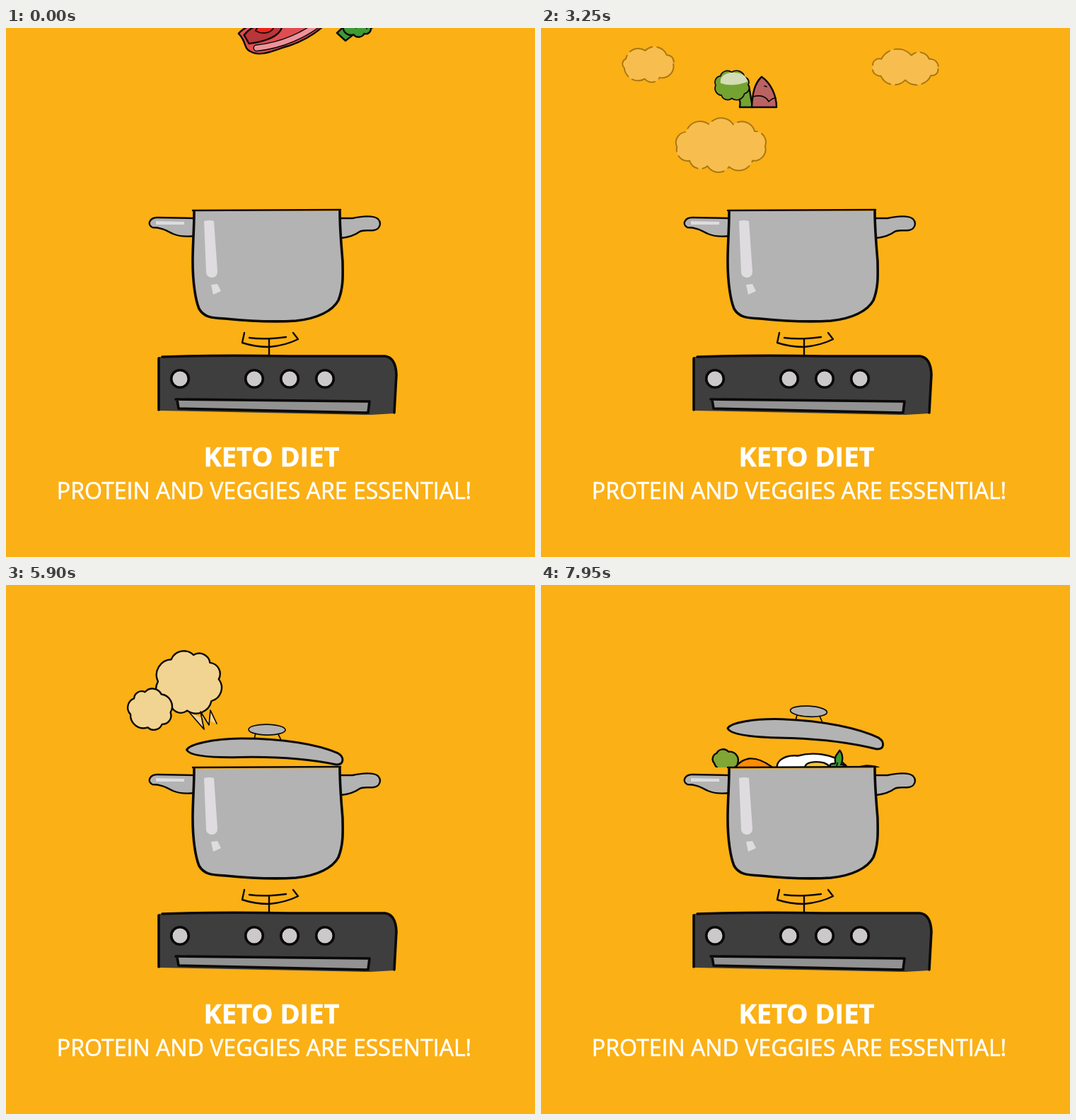
Animation of 748x748 px, one loop 8 s. Source, as an HTML page:

```html
<!DOCTYPE html>
<html lang="en">
<head>
<meta charset="utf-8">
<title>Keto diet</title>
<style>
  html, body { margin: 0; width: 100%; height: 100%; overflow: hidden; background: #fbb015; }
  svg { display: block; width: 100vw; height: 100vh; }
  .ink { stroke: #0b0908; stroke-width: 2.4; stroke-linecap: round; stroke-linejoin: round; }
  .line { fill: none; }
  .bold { stroke-width: 3.6; }
  .thin { stroke-width: 1.7; }
  .metal { fill: #b3b3b3; }
  .shine { fill: #dedcde; }
  .cream { fill: #f1d492; }
  .pink { fill: #f1d7c3; stroke-width: 2; stroke-dasharray: 34 7; }
  .fat { stroke: #ef9299; stroke-width: 7; }
  text { fill: #fff; stroke: #fff; stroke-width: .6; text-anchor: middle; font-family: "Open Sans", "Noto Sans", sans-serif; }
</style>
</head>
<body>
<svg viewBox="0 0 748 748">
  <defs><clipPath id="aboveRim"><rect width="748" height="258"/></clipPath></defs>

  <g id="steamBack" class="ink"></g>

  <g clip-path="url(#aboveRim)" class="ink">
    <g id="egg">
      <path fill="#fff" d="M330 165C319 150 335 138 355 139C372 133 405 132 422 148C434 158 428 170 412 170C390 178 345 173 330 165Z"/>
      <path fill="#f6c630" d="M366 156C364 147 380 145 392 147C404 151 406 160 395 163C384 166 372 162 366 156Z"/>
    </g>
    <g id="carrot">
      <path fill="#ff8b05" d="M262 178C254 162 264 147 280 143C298 140 318 154 338 174C360 198 376 218 395 240L385 250C340 225 290 200 262 178Z"/>
      <path fill="#80a634" data-cloud="247 146 21 13 5"/>
      <path fill="#4b9d2f" class="thin" d="M232 185L232 175C226 166 233 157 243 160C254 157 256 170 245 175C239 178 236 178 232 185Z"/>
    </g>
    <g id="fish">
      <path fill="#887c74" d="M244 194C262 180 300 184 325 198C340 206 350 216 356 225C352 240 318 247 295 243C268 238 250 215 244 194Z"/>
      <path fill="#c7c4c1" class="thin" d="M244 194C255 187 265 186 273 187C282 200 281 216 275 228C258 220 248 208 244 194Z"/>
      <path fill="#887c74" d="M354 225C355 205 365 190 384 190C384 202 376 215 366 222C378 224 385 233 388 243C372 250 358 242 354 225Z"/>
      <path id="scales" class="line"/>
    </g>
    <g id="steak">
      <path fill="#df4d50" d="M368 262C376 244 402 236 410 210C408 178 428 152 456 152C480 154 494 172 492 192C488 222 460 250 432 266C415 278 402 286 390 282C380 280 382 270 368 262Z"/>
      <path class="line" style="stroke-width:10" d="M398 275C428 264 462 240 483 206"/>
      <path class="line fat" d="M398 275C428 264 462 240 483 206"/>
      <path fill="#ad3537" d="M418 215C415 190 428 163 458 162C480 164 484 185 474 202C464 215 448 215 440 224C432 232 420 228 418 215Z"/>
      <path fill="#b93639" d="M376 262C386 240 410 232 425 238C424 252 405 264 386 272Z"/>
      <path fill="#ed241e" class="thin" d="M390 252C392 242 405 237 414 241C412 250 400 255 390 252Z"/>
    </g>
    <g id="herb">
      <path fill="#3c9b31" d="M404 178C388 174 399 161 401 157C396 146 406 151 407 148C404 138 410 135 412 130C418 136 417 146 415 150C423 148 419 158 416 160C425 165 414 178 404 178Z"/>
      <path class="line thin" d="M400 183L410 148"/>
    </g>
    <g id="broccoli" fill="#3f9b34">
      <path d="M428 251L440 262L462 245L444 236Z"/>
      <path data-cloud="457 232 26 25 10"/>
      <path class="line thin" d="M444 224q6-5 9 3M462 220q7-1 6 6M446 240q7-3 9 4M463 240q7-2 7 5"/>
    </g>
    <g id="soup">
      <path stroke="none" fill="#f4cf5d" d="M334 253Q355 247 376 252T420 251T468 250V260H334Z"/>
      <path class="line" d="M334 253Q355 247 376 252T420 251T468 250"/>
    </g>
  </g>

  <g id="steamMid" class="ink"></g>

  <g clip-path="url(#aboveRim)" class="ink">
    <g id="floret" fill="#74a331">
      <path d="M281 262Q284 245 270 247L294 232L299 262Z"/>
      <path class="thin" data-cloud="270 231 26 21 8"/>
      <path fill="#d3dcb4" stroke="none" d="M254 228Q252 216 268 213Q290 212 292 226Q270 234 254 228Z"/>
    </g>
    <g id="redFish">
      <path fill="#bb6263" d="M298 262C299 242 302 228 312 219C325 228 333 245 333 262Z"/>
      <path class="line thin" d="M300 247Q316 243 322 254Q327 249 332 249M316 232l3 1"/>
    </g>
  </g>

  <g id="lid" class="ink metal">
    <path class="line thin" style="fill:none" d="M351 215L349 223M383 215L387 223"/>
    <path style="stroke-width:3" d="M254 239C258 231 290 223 330 222C390 221 440 229 468 241C477 246 477 257 466 257C440 252 400 247 345 248C300 250 258 249 254 239Z"/>
    <ellipse class="thin" cx="367" cy="209" rx="26" ry="7.5"/>
  </g>

  <g class="ink metal">
    <path d="M267 269L214 268C203 268 199 278 207 282C220 282 228 287 236 291C245 295 258 295 267 294"/>
    <path d="M473 269L490 269C505 266 520 265 526 270C532 276 528 285 520 286C512 287 505 285 500 288C492 294 483 296 474 297"/>
    <path class="bold" d="M266 260C266 285 264 305 264 330C264 360 268 385 273 397C280 409 290 410 310 411C340 414 380 416 410 414C440 411 462 400 470 385C478 365 476 345 476 330C474 305 472 285 472 259"/>
    <path d="M264 258L473 257"/>
  </g>
  <path class="shine" d="M212 273L252 274V278H212ZM280 273Q287 271 294 273L299 344Q299 352 292 353Q284 353 283 346ZM290 363L299 362L304 372L293 377Z"/>

  <g class="ink">
    <path class="line" d="M337 431L334 445Q352 451 372 451Q395 449 413 440L406 431M344 438Q366 441 396 437M372 441V462"/>
    <path fill="#3e3e3e" stroke="none" d="M216 465H538Q551 467 552 490L549 545L515 547L216 541Z"/>
    <path class="line bold" d="M216 540V467M221 465Q300 462 400 464L536 464Q551 466 552 490L549 544"/>
    <path fill="#929292" class="bold" d="M240 525L514 528L512 544L244 538L242 526"/>
    <g id="knobs" fill="#cbc9ca" class="bold"></g>
  </g>

  <g id="steamFront" class="ink"></g>

  <text x="375.5" y="620" font-size="38" font-weight="700">KETO DIET</text>
  <text x="365" y="666" font-size="32.1">PROTEIN AND VEGGIES ARE ESSENTIAL!</text>
</svg>

<script>
const LOOP = 8000, CYCLE = 3700, STEP = 50;
const byId = id => document.getElementById(id);
const clamp = v => Math.max(0, Math.min(1, v));
const jitter = n => { const v = Math.sin(n * 12.9898) * 43758.5453; return v - Math.floor(v) - 0.5; };

// Scalloped outline around an ellipse, with slightly uneven bumps.
function cloud(cx, cy, rx, ry, count) {
  const corner = i => {
    const a = (i % count + 0.5 * jitter(cx + i % count)) / count * 2 * Math.PI;
    return [cx + 0.88 * rx * Math.cos(a), cy + 0.88 * ry * Math.sin(a)];
  };
  let [px, py] = corner(0), d = `M${px} ${py}`;
  for (let i = 1; i <= count; i++) {
    const [x, y] = corner(i), r = Math.hypot(x - px, y - py) * 0.6;
    d += `A${r} ${r} 0 0 1 ${x} ${y}`;
    [px, py] = [x, y];
  }
  return d + 'Z';
}

for (const path of document.querySelectorAll('[data-cloud]'))
  path.setAttribute('d', cloud(...path.dataset.cloud.split(' ').map(Number)));

let scales = 'M266 198v8';
for (let i = 0; i < 4; i++)
  scales += `M${283 + i * 16} ${187 + i * i * 1.8}` + `q11 5 1 ${13 - i}`.repeat(4);
byId('scales').setAttribute('d', scales);

byId('knobs').innerHTML = [246, 351, 401, 451]
  .map(x => `<circle cx="${x}" cy="496" r="12.3"/>`).join('');

function place(node, [cx, cy], { dx = 0, dy = 0, rot = 0, sx = 1, sy = 1, opacity = 1 }) {
  node.setAttribute('transform',
    `translate(${cx + dx} ${cy + dy}) rotate(${rot}) scale(${sx} ${sy}) translate(${-cx} ${-cy})`);
  node.style.opacity = opacity;
}

// Steam grows out of its source until `full`, then drifts and fades by `gone`.
const steams = [];
function steam(layer, look, clouds, motion, wisps = '') {
  const node = document.createElementNS('http://www.w3.org/2000/svg', 'g');
  node.setAttribute('class', look);
  node.innerHTML = clouds.map(c => `<path d="${cloud(...c)}"/>`).join('') +
    `<path class="thin" d="${wisps}"/>`;
  byId(layer).append(node);
  steams.push({ node, ...motion });
}

steam('steamBack', 'cream', [[240, 174, 40, 43, 7]],
  { source: [275, 210], born: 850, full: 1250, gone: 2000, vx: -0.06, vy: -0.16 },
  'M264 196L281 198Q274 190 275 180');
steam('steamBack', 'cream', [[258, 138, 49, 45, 8], [204, 176, 33, 29, 7]],
  { source: [285, 210], born: 1700, full: 2200, gone: 2400, vx: -0.03, vy: -0.04 },
  'M260 181L280 204L275 179L287 198L289 177L298 196');
steam('steamBack', 'cream', [[252, 131, 56, 42, 9], [201, 164, 42, 29, 8]],
  { source: [280, 190], born: 2200, full: 2500, gone: 2700, vx: -0.08, vy: -0.2 },
  'M268 166L275 175M279 164L282 175M288 163L287 171');

const burst = { source: [300, 240], born: 2650, full: 3000, gone: 3300, vy: -0.12 };
steam('steamMid', 'pink', [[262, 196, 71, 35, 10]], { ...burst, vx: -0.03 });
steam('steamMid', 'pink', [[177, 82, 40, 23, 7]], { ...burst, vx: -0.1 });
steam('steamMid', 'pink', [[490, 86, 53, 20, 8]], { ...burst, vx: 0.1 });

steam('steamFront', 'pink', [[282, 251, 24, 12, 7], [354, 257, 29, 13, 7], [429, 254, 25, 5, 6]],
  { source: [355, 258], born: 2350, full: 2500, gone: 2700, vx: 0, vy: -0.03 });

function drawSteam({ node, source, born, full, gone, vx, vy }, t) {
  const size = 0.2 + 0.8 * clamp((t - born) / (full - born));
  const drift = Math.max(0, t - full);
  place(node, source, {
    dx: vx * drift, dy: vy * drift, sx: size, sy: size,
    opacity: t > born ? clamp((gone - t) / 150) : 0
  });
}

// Each food drops past its pose at 400 ms; drift and spin are per millisecond.
const foods = {
  egg: { pivot: [375, 155], drift: 0.05, spin: 0.02, pull: 0 },
  carrot: { pivot: [300, 180], drift: 0.08, spin: 0.02, pull: 0 },
  fish: { pivot: [310, 215], drift: 0.06, spin: -0.02, pull: 0 },
  steak: { pivot: [405, 245], drift: 0.09, spin: -0.0375, pull: 0.0002 },
  herb: { pivot: [407, 155], drift: 0.06, spin: 0.02, pull: 0 },
  broccoli: { pivot: [456, 235], drift: -0.1, spin: 0, pull: 0.0002 }
};

function drawFood(id, t) {
  const { pivot, drift, spin, pull } = foods[id];
  const s = t - 400;
  place(byId(id), pivot, {
    dx: drift * s, dy: 0.69 * s + pull * s * s, rot: spin * s, opacity: t < 700 ? 1 : 0
  });
}

function lidPose(t) {
  if (t < 600) {
    const height = ((600 - t) / 200) ** 1.2;
    return { dx: 50.5 * height, dy: -161 * height, rot: 16.5 * height };
  }
  if (t < 2300) {
    const lift = (1 - Math.cos((t - 600) / 1600 * 9 * Math.PI)) / 2;
    return { dx: 1.5 * lift, dy: 2 - 6.5 * lift, rot: 1.3 * lift - 0.5 };
  }
  const v = (t - 2300) / 200;
  return {
    dx: 7 * v ** 3, dy: -18 * v ** 2.25, rot: 6.1 * v ** 3,
    sy: Math.max(0.3, 1 - 0.016 * v ** 3), opacity: t < 3150 ? 1 : 0
  };
}

function drawBoil(t) {
  const s = t - 3000;
  const rise = { dy: -0.4 * s - 0.0008 * s * s, opacity: s > -250 && s < 450 ? 1 : 0 };
  place(byId('floret'), [270, 235], rise);
  place(byId('redFish'), [316, 240], rise);
  place(byId('soup'), [400, 255], { dy: Math.abs(s) / 12 });
}

function draw(now) {
  const t = Math.floor((now % LOOP) / STEP) * STEP % CYCLE;
  steams.forEach(s => drawSteam(s, t));
  Object.keys(foods).forEach(id => drawFood(id, t));
  place(byId('lid'), [364.5, 244], lidPose(t));
  drawBoil(t);
}

const start = performance.now();
function tick() {
  draw(performance.now() - start);
  requestAnimationFrame(tick);
}
tick();
</script>
</body>
</html>
```
